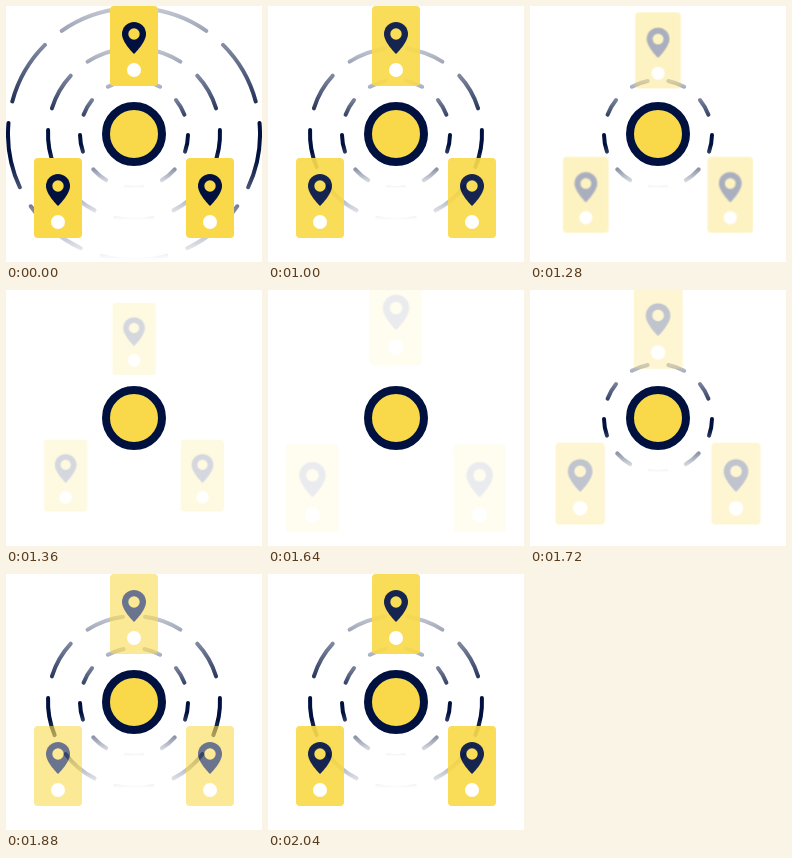
An HTML page for the animation above (2080 ms loop, 256 by 256 pixels).

```html
<!DOCTYPE html>
<html lang="en">
<head>
<meta charset="utf-8">
<title>Location rings</title>
<style>
  html, body { margin: 0; width: 100%; height: 100%; overflow: hidden; background: #fff; }
  svg { display: block; width: 100vw; height: 100vh; }
</style>
</head>
<body>
<svg viewBox="0 0 256 256">
  <defs>
    <linearGradient id="fade" x1="0" y1="0" x2="0" y2="1">
      <stop offset="0" stop-color="#c4c8d3"/>
      <stop offset=".45" stop-color="#00113f"/>
      <stop offset=".6" stop-color="#00113f"/>
      <stop offset="1" stop-color="#fff"/>
    </linearGradient>
    <g id="phone">
      <rect width="48" height="80" rx="4" fill="#f9d949"/>
      <path d="M24 48C24 48 12 36.5 12 28A12 12 0 0 1 36 28C36 36.5 24 48 24 48Z" fill="#00113f"/>
      <circle cx="24" cy="28" r="5.7" fill="#f9d949"/>
      <circle cx="24" cy="64" r="7" fill="#fff"/>
    </g>
  </defs>
  <g id="rings" fill="none" stroke="url(#fade)" stroke-width="4" stroke-linecap="round"></g>
  <g id="phones">
    <use href="#phone" x="104" y="0"/>
    <use href="#phone" x="28" y="152"/>
    <use href="#phone" x="180" y="152"/>
  </g>
  <circle cx="128" cy="128" r="28" fill="#f9d949" stroke="#00113f" stroke-width="8"/>
</svg>
<script>
const LOOP = 2080, STEP = 40, FADE = 480, CENTER = 128, DASHES = 9;
const phones = document.getElementById('phones');

// Each ring is hidden from `off` until `on`.
const rings = [
  { r: 126, dash: 66, off: 1000, on: 2080 },
  { r: 86, dash: 38, off: 1200, on: 1880 },
  { r: 54, dash: 17, off: 1360, on: 1680 }
].map(ring => ({ ...ring, node: drawRing(ring) }));

function drawRing({ r, dash }) {
  const path = document.createElementNS('http://www.w3.org/2000/svg', 'path');
  const half = dash / r / 2;
  const point = a => `${CENTER + r * Math.cos(a)} ${CENTER + r * Math.sin(a)}`;
  let d = '';
  for (let i = 0; i < DASHES; i++) {
    const mid = Math.PI / 2 + i * 2 * Math.PI / DASHES;
    d += `M${point(mid - half)}A${r} ${r} 0 0 1 ${point(mid + half)}`;
  }
  path.setAttribute('d', d);
  document.getElementById('rings').append(path);
  return path;
}

const clamp = x => Math.min(1, Math.max(0, x));

function phoneOpacity(t) {
  if (t < 1000) return 1;
  return t < 1500 ? clamp(1 - (t - 960) / FADE) : clamp((t - 1600) / FADE);
}

function phoneScale(t) {
  if (t < 1500) return 1 - 0.1 * Math.max(0, t - 1200) / 160;
  return 1 + 0.1 * Math.max(0, 1 - (t - 1640) / 107);
}

function draw(time) {
  const t = Math.floor((time % LOOP) / STEP) * STEP;
  for (const { node, off, on } of rings) {
    node.style.display = t >= off && t < on ? 'none' : '';
  }
  const s = phoneScale(t), shift = CENTER * (1 - s);
  phones.setAttribute('opacity', phoneOpacity(t));
  phones.setAttribute('transform', `translate(${shift} ${shift}) scale(${s})`);
}

const start = performance.now();
function tick() {
  draw(performance.now() - start);
  requestAnimationFrame(tick);
}
tick();
</script>
</body>
</html>
```
